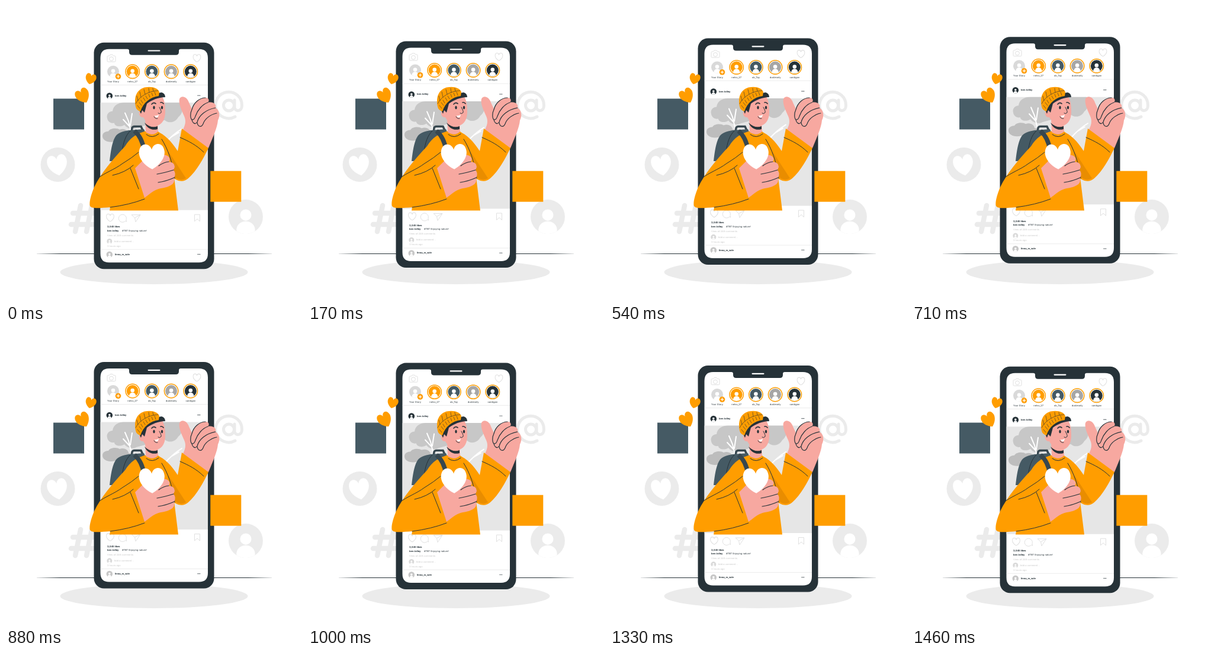
Animation, 500 px wide and 500 px high, one loop 1.5 s. Source, as an HTML page:

```html
<!DOCTYPE html>
<html lang="en">
<head>
<meta charset="utf-8">
<style>
  html, body { margin: 0; width: 100%; height: 100%; overflow: hidden; background: #fff; }
  svg { display: block; width: 100%; height: 100%; }
  text { font: 4px Inter, sans-serif; fill: #263238; text-rendering: geometricPrecision; }
  .bold { font-weight: 700; }
  .pale { fill: #c7c7c7; }
  .mid { text-anchor: middle; }
  .icon { fill: none; stroke: #e0e0e0; stroke-linejoin: round; }
  .ink { fill: none; stroke: #263238; stroke-linecap: round; stroke-linejoin: round; }
  .skin { fill: #f7a8a0; }
  .orange { fill: #ff9d00; }
  .dark { fill: #263238; }
  .slate { fill: #455a64; }
</style>
</head>
<body>
<svg viewBox="0 0 500 500">
  <defs>
    <path id="heart" d="M0 10C-6 7-10.500 1-10-4C-9.600-8-7.500-10-5-10C-2.500-10-.5-8 0-5.500C.5-8 2.500-10 5-10C7.500-10 9.600-8 10-4C10.500 1 6 7 0 10Z"/>
    <g id="user">
      <circle r="10"/>
      <path fill="#fff" d="M0-4.300A3.300 3.300 0 0 1 0 2.300A3.300 3.300 0 0 1 0-4.300M-5.400 8.400C-6 .8 6 .8 5.400 8.400Q0 11.800-5.400 8.400Z"/>
    </g>
    <linearGradient id="fade">
      <stop offset="0" stop-color="#263238" stop-opacity=".15"/>
      <stop offset=".1" stop-color="#263238"/>
      <stop offset=".9" stop-color="#263238"/>
      <stop offset="1" stop-color="#263238" stop-opacity=".15"/>
    </linearGradient>
  </defs>

  <!-- Backdrop -->
  <rect x="52" y="418" width="397" height="1" fill="url(#fade)"/>
  <ellipse cx="250" cy="449.500" rx="158.500" ry="20.500" fill="#ebebeb"/>
  <circle cx="87.500" cy="268" r="29" fill="#ebebeb"/>
  <use href="#heart" fill="#fff" transform="translate(87 269) rotate(-10) scale(1.680 1.740)"/>
  <use href="#user" fill="#ebebeb" transform="translate(405 356) scale(2.900)"/>
  <g fill="none" stroke="#ebebeb" stroke-linecap="round">
    <path stroke-width="8.500" d="M126 337L117 381M145 337L136 381M113 350H150M110 369H147"/>
    <path stroke-width="5" d="M387 187A22.300 22.300 0 1 1 398.500 168C398.500 179 387 179 386 171V159"/>
    <circle cx="376.500" cy="168" r="9" stroke-width="5"/>
  </g>

  <!-- Phone -->
  <g id="phone">
    <rect class="dark" x="148.500" y="62" width="203" height="382.500" rx="17"/>
    <path fill="#fff" d="M174 73H205Q208 73 208 76V78Q208 83 213 83H287Q292 83 292 78V76Q292 73 295 73H326Q341 73 341 88V418.500Q341 433.500 326 433.500H174Q159.500 433.500 159.500 418.500V88Q159.500 73 174 73Z"/>
    <rect x="239.500" y="74.700" width="21" height="2.200" rx="1.100" fill="#fff"/>
    <g class="icon">
      <path d="M171 86Q171 84.500 172.500 84.500H174.500L176 82.500H180L181.500 84.500H183.500Q185 84.500 185 86V93Q185 94.500 183.500 94.500H172.500Q171 94.500 171 93Z"/>
      <circle cx="178" cy="89.500" r="3.400"/>
      <use href="#heart" stroke-width="1.600" transform="translate(322.500 88.500) scale(.64)"/>
      <path stroke-width=".6" d="M159.500 133.700H341M159.500 411.500H341"/>
      <use href="#heart" stroke-width="1.600" transform="translate(176 358) scale(.64)"/>
      <path d="M201.500 363.500A6.500 6.500 0 1 1 203 361L203.500 364.500ZM212 353H227L219 365L217.500 358ZM217.500 358L227 353M318.500 352.500H327.500V364L323 360L318.500 364Z"/>
    </g>
    <g id="stories"></g>
    <circle class="orange" cx="189.500" cy="119.300" r="4.800"/>
    <path stroke="#fff" stroke-width="1.200" d="M186.800 119.300H192.200M189.500 116.600V122"/>

    <use href="#user" class="dark" transform="translate(174.800 152) scale(.53)"/>
    <text class="bold" x="184" y="153">ben.tolley</text>
    <rect x="159.500" y="163.500" width="181.500" height="181.500" fill="#e6e6e6"/>
    <path fill="#c7c7c7" d="M171 190C169 183 174 178 180 178C181 168 190 163.500 199 163.500H295C302 170 298 183 291 188C287 196 276 200 268 193L220 206C214 210 203 206 200 201C193 206 183 203 183 198C176 199 172 195 171 190Z"/>
    <path fill="#bdbdbd" d="M163 220C163 213 170 212 173 212C176 206 188 206 192 209C200 206 207 211 207 216C217 217 218 226 212 229C202 232 190 230 184 229C174 232 163 228 163 220Z"/>
    <path fill="none" stroke="#fff" stroke-width="2" stroke-linecap="round" d="M214 225L207 195L201 181M209 204L198 192M210 202L213 182M268 233Q282 217 297 208M280 221L292 214"/>

    <text class="bold" x="171" y="374.500">3,045 likes</text>
    <text class="bold" x="171" y="381">ben.tolley</text>
    <text x="196" y="381">#TBT Enjoying nature!</text>
    <text class="pale" x="171" y="389">View all 246 comments</text>
    <use href="#user" fill="#d9d9d9" transform="translate(174.800 397.800) scale(.45)"/>
    <text class="pale" x="182.500" y="399">Add a comment...</text>
    <text class="pale" x="171" y="407">3 hours ago</text>
    <use href="#user" fill="#c7c7c7" transform="translate(174.800 420) scale(.53)"/>
    <text class="bold" x="184" y="421">linna_m_vale</text>
    <path class="ink" stroke-width="1.300" stroke-dasharray="0 1.800" d="M324 151.500H328M324 419.700H328"/>
  </g>

  <!-- Backpack -->
  <path fill="none" stroke="#37474f" stroke-width="3.500" d="M212 213L213 206Q214 203.500 217 203.500H228L232 212"/>
  <path class="slate" d="M175 262C177 245 179 231 184 222C188 214 197 212 207 210L233 208L240 225L208 262Z"/>
  <path class="ink" d="M210 211C202 218 198 231 196 246"/>

  <!-- Raised arm and hand -->
  <path class="skin" d="M293 157C296 150 306 153 309 163L314 174C317 163 327 155 337 155C343 155 344 160 341 163C350 161 356 166 354 172C361 176 362 186 358 193C357 206 349 222 342 240L298 210C304 200 304 193 301 186C297 177 291 165 293 157Z"/>
  <path class="ink" stroke-width="1.200" d="M314 175C311 181 311 189 314 192C318 193 319 189 320 186C324 175 332 166 341 163M314 192C315 198 320 201 323 196C326 185 337 175 354 172M323 197C324 204 330 206 333 199C336 190 346 183 356 181M314 175C317 163 327 155 337 155"/>
  <path class="orange" d="M255 212C267 216 280 229 290 245L297 207L342 240C333 258 322 279 308 291C300 299 287 296 281 288L255 265Z"/>
  <path class="ink" d="M294 222C308 228 322 235 334 247"/>

  <!-- Torso -->
  <path class="orange" d="M237 211C221 215 210 222 201 237C181 258 160 283 149 306C143 320 140 333 142 338C145 343 160 341 176 340L175 345.500H291L284 289C283 260 273 222 257 212Z"/>
  <path fill="#e98d00" d="M274 245L304 291Q294 297 284 288Q281 266 274 245Z"/>
  <path fill="none" stroke="#37474f" stroke-width="7.500" d="M217 211C225 218 231 229 233 243"/>
  <path class="ink" d="M263 225C273 241 281 262 285 291M155 291C168 281 182 277 197 266Q212 257 224 247M180 286Q202 281 215 269M176 340Q208 336 234 326M210 274L224 309M237 217Q247 225 258 216"/>

  <!-- Head -->
  <path class="skin" d="M235 190L236 213Q248 221 257 212L256 195Z"/>
  <path class="dark" d="M234 197C241 204 249 206 256 203L256 208C246 211 238 206 234 197Z"/>
  <path class="skin" d="M230 169L262 150C268 158 269 167 269 179C269 191 264 200 255 202C245 202 236 196 232 188C224 189 222 176 230 176Z"/>
  <path class="dark" d="M225 176C230 163 246 148 263 146Q269 148 269 154C257 154 246 159 238 165L234 180L230 176L228 182Z"/>
  <path class="orange" d="M219 170C216 154 220 142 234 137.500C246 135 256 138 259 145L258 152C243 154 232 163 227 178Q220 176 219 170Z"/>
  <path class="ink" stroke-width=".6" d="M219 165C225 153 241 143 257 143M223 160L221 152M228 154L226 145M235 149L233 141M242 146L241 139M249 144L248 139M222 168L226 173M225 163L229 168M228 159L231 164M232 155L235 160M236 152L239 157M241 149L243 154M246 147L248 152M251 145L253 151"/>
  <path class="ink" stroke-width="1.600" d="M246 166Q249 162 253 165M261 163Q264 162 266 165"/>
  <path class="ink" d="M259 171Q263 178 262 180Q260 183 257 181M250 187Q252 191 256 190"/>
  <ellipse class="dark" cx="250" cy="171.500" rx="1.700" ry="2.800"/>
  <ellipse class="dark" cx="263.500" cy="171.500" rx="1.700" ry="2.800"/>
  <path fill="#fff" d="M251 185Q255 186 258 183.500Q257 189 254 188.500Q252 188 251 185Z"/>

  <!-- Hand holding a heart -->
  <path class="skin" d="M218 274L230 262L258 253Q270 249 275 255Q278 259 275 263Q285 264 285 272L283 277Q288 283 284 290Q286 299 278 303C270 308 262 307 255 310C247 313 241 319 234 324Z"/>
  <path class="ink" stroke-width="1.200" d="M258 270Q266 264 275 263M255 284Q267 282 283 277M257 298Q271 296 284 290"/>
  <use href="#heart" fill="#fff" transform="translate(246.500 254.500) rotate(-2) scale(2.150 2.120)"/>

  <!-- Floating badges -->
  <rect class="slate" x="80" y="156.500" width="52" height="52"/>
  <rect class="orange" x="345.300" y="278.700" width="52" height="52"/>
  <use href="#heart" class="orange" transform="translate(143 123.300) rotate(14) scale(.9)"/>
  <use href="#heart" class="orange" transform="translate(130 152) rotate(-29) scale(1.160 1.250)"/>
</svg>
<script>
  const stories = [
    ["Your Story", "#d9d9d9"], ["nelvo_27", "#ff9d00"], ["ob_Tay", "#455a64"],
    ["dustmarly", "#a6a6a6"], ["cardigan", "#263238"]
  ];
  document.getElementById("stories").innerHTML = stories.map(([name, color], i) => {
    const x = 181 + i * 32.7;
    const ring = i ? `<circle cx="${x}" cy="111" r="11.700" fill="#fff" stroke="#ff9d00" stroke-width="1.500"/>` : "";
    return `${ring}<use href="#user" fill="${color}" transform="translate(${x} 111)"/>
      <text class="mid" x="${x}" y="129">${name}</text>`;
  }).join("");

  const phone = document.getElementById("phone");
  const LOOP = 1500, RISE = 10, LEAD = 20;

  // The phone floats up and down at constant speed.
  function draw() {
    const phase = (performance.now() + LEAD) % LOOP / LOOP;
    const lift = RISE * (1 - Math.abs(2 * phase - 1));
    phone.setAttribute("transform", `translate(0 ${-lift})`);
    requestAnimationFrame(draw);
  }
  draw();
</script>
</body>
</html>
```
